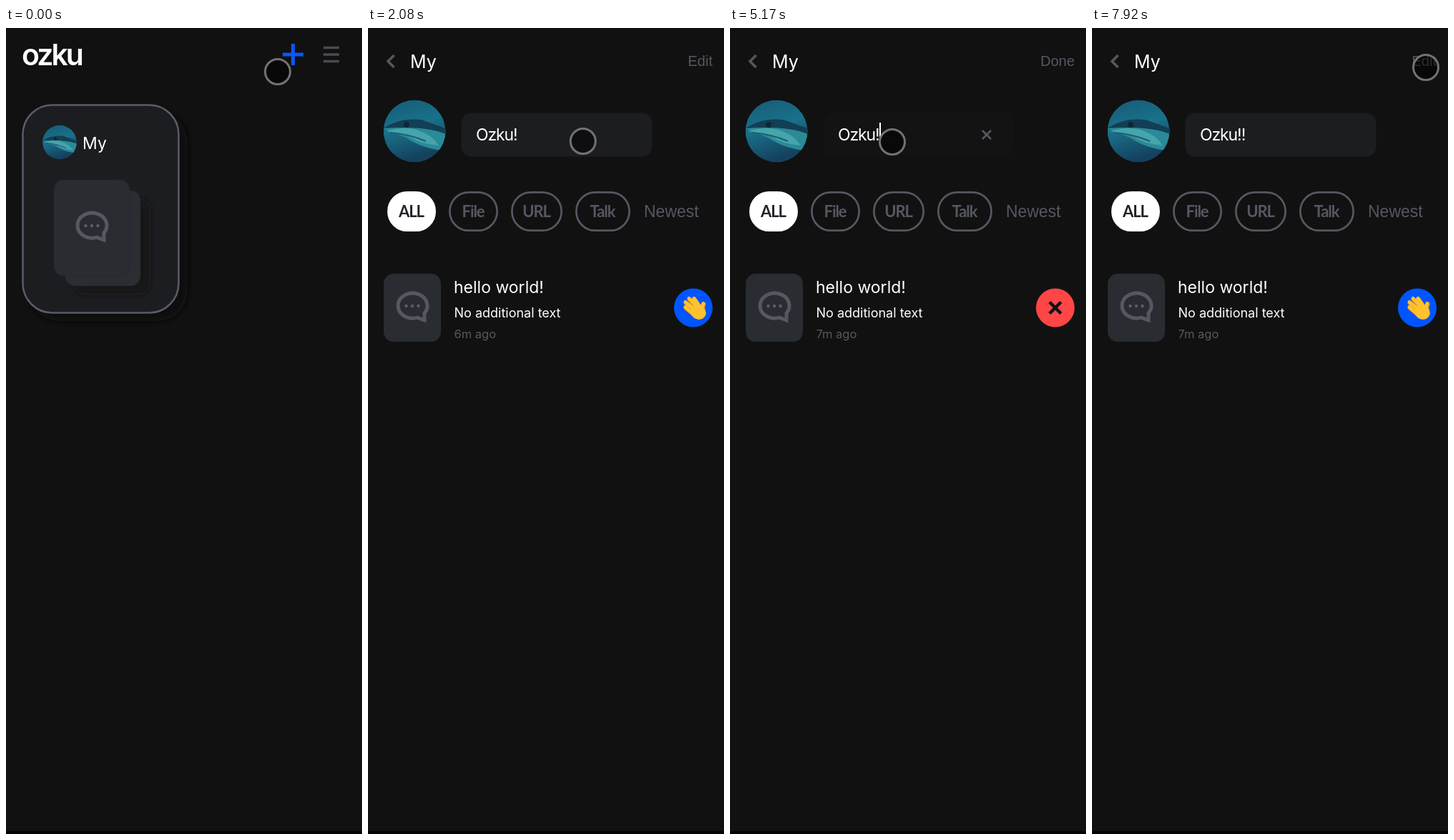
An HTML page that plays this animation: 498x1125 px, repeating every 8 s.

```html
<!DOCTYPE html>
<html lang="en">
<head>
<meta charset="utf-8">
<style>
  html, body { margin: 0; height: 100%; overflow: hidden; background: #111; }
  svg { display: block; width: 100%; height: 100%; }
  text { font: 400 23px Inter, sans-serif; fill: #fff; }
  .logo { font-size: 41px; font-weight: 600; letter-spacing: -3px; }
  .title { font-size: 25px; }
  .name { letter-spacing: -1.1px; }
  .note { font-size: 18px; }
  .age { font-size: 16.5px; }
  .chip { font: 700 22px Lato, sans-serif; letter-spacing: -1.1px; text-anchor: middle; }
  .plain { font: 20px "Liberation Sans", Arial, sans-serif; }
  .age, .chip, .plain { fill: #555862; }
  .line { fill: none; stroke: #555862; }
</style>
</head>
<body>
<svg viewBox="0 0 498 1125">
  <defs>
    <linearGradient id="sea" x2=".3" y2="1">
      <stop stop-color="#175a76"/><stop offset=".5" stop-color="#19718a"/><stop offset="1" stop-color="#14415f"/>
    </linearGradient>
    <clipPath id="round"><circle r="43.5"/></clipPath>
    <filter id="soft" x="-30%" y="-30%" width="160%" height="160%"><feGaussianBlur stdDeviation="5"/></filter>
    <g id="photo" clip-path="url(#round)">
      <circle r="43.5" fill="url(#sea)"/>
      <path d="M-44-4Q-20-20 10-16L44-4V28Q10 24-12 9Z" fill="#2b8a98"/>
      <path d="M-44-4Q-20-20 10-16L44-4V4Q15-8-44-4Z" fill="#123f55"/>
      <path d="M-40 0Q-10-8 8 0Q24 5 34 20Q8 18-8 7Z" fill="#55b3b5" opacity=".65"/>
      <path d="M-34 2Q-8 4 16 14" fill="none" stroke="#1c5f70" stroke-width="2"/>
      <circle cx="-11" cy="-9" r="4" fill="#0b2937"/>
    </g>
    <g id="bubble" fill="#5a5d69">
      <path class="line" d="M17 20V10A20.5 17.5 0 1 0 7 16.2Z" stroke-width="5"/>
      <circle cx="-8.5" r="2.2"/><circle r="2.2"/><circle cx="8.5" r="2.2"/>
    </g>
  </defs>

  <rect width="498" height="1125" fill="#111"/>
  <rect y="1121" width="498" height="4" fill="#070305"/>

  <g id="home">
    <text class="logo" x="22" y="52">ozku</text>
    <path d="M387 37H416M401.5 22V52" stroke="#0a55ff" stroke-width="5"/>
    <path d="M444 27.5H466M444 37H466M444 46.5H466" stroke="#4a4b50" stroke-width="3.5"/>
    <rect x="32" y="117" width="222" height="292" rx="42" fill="#0c0c0d" filter="url(#soft)"/>
    <rect x="23.5" y="107.5" width="218" height="290" rx="41" fill="#1c1d21" stroke="#595c68" stroke-width="2.5"/>
    <use href="#photo" transform="translate(75 159.5) scale(.55)"/>
    <text x="107" y="169">My</text>
    <rect x="96" y="240" width="104" height="130" rx="14" fill="#131416" filter="url(#soft)"/>
    <rect x="83" y="227" width="105" height="133" rx="14" fill="#2a2d31"/>
    <rect x="67" y="212" width="106" height="134" rx="14" fill="#292c30" stroke="#25282b" stroke-width=".6"/>
    <use href="#bubble" x="120" y="276"/>
  </g>

  <g id="detail">
    <path class="line" d="M36.5 38L28 46.5L36.5 55" stroke-width="3.5"/>
    <text class="title" x="59" y="56">My</text>
    <text id="mode" class="plain" x="482" y="53" text-anchor="end"></text>
    <use href="#photo" x="65" y="144"/>
    <rect id="field" x="130.5" y="118.5" width="267" height="61" rx="14"/>
    <text id="name" class="name" x="151" y="157"></text>
    <path id="caret" d="M210 132V165" stroke="#fff" stroke-width="2"/>
    <g id="chips"></g>
    <text class="plain" x="386" y="264" style="font-size:23px">Newest</text>
    <rect x="22" y="343" width="80" height="95" rx="14" fill="#292c30"/>
    <use href="#bubble" x="62" y="388"/>
    <text x="120" y="370">hello world!</text>
    <text class="note" x="120.500" y="404">No additional text</text>
    <text id="age" class="age" x="120.500" y="433"></text>
    <g id="wave" transform="translate(455 390.500)">
      <circle r="27" fill="#0055ff"/>
      <g stroke="#ffc22e" stroke-width="6" stroke-linecap="round" fill="none">
        <path d="M-11-1L2 10M-11-8L4 4M-6-13L7 0M1-13L10 0M14-6Q11 0 14 7" stroke="#e08a1c" transform="translate(.7 1.3)"/>
        <ellipse cx="7" cy="6" rx="8" ry="7" fill="#ffc22e" transform="rotate(40 7 6)"/>
        <path d="M-11-1L2 10M-11-8L4 4M-6-13L7 0M1-13L10 0M14-6Q11 0 14 7" stroke-width="5"/>
      </g>
    </g>
    <g id="remove">
      <circle cx="455" cy="390.500" r="27" fill="#ff4646"/>
      <path d="M447 382.500l16 16m0-16l-16 16" stroke="#111" stroke-width="4.500"/>
      <path class="line" d="M353 143l12 12m0-12l-12 12" stroke-width="2.700"/>
    </g>
  </g>

  <circle id="cursor" r="17.500" fill="#000" fill-opacity=".5" stroke="#727272" stroke-width="3"/>
</svg>
<script>
const $ = id => document.getElementById(id);
const show = (id, on) => $(id).setAttribute('display', on ? 'inline' : 'none');

const LOOP = 8000, STEP = 1000 / 12;
const OPEN = 1830, EDIT = 4330, FOCUS = 5000, HIDE = 5830, TYPE = 6160, SHOW = 7080, DONE = 7660;

// Pointer stops: time, x, y
const stops = [
  [0, 380, 61], [80, 386, 58], [400, 386, 58], [580, 402, 50], [1250, 202, 180], [1500, 193, 201],
  [1830, 193, 201], [2420, 466, 92], [2670, 478, 103], [2830, 472, 98], [3300, 464, 64],
  [3700, 456, 44], [4080, 446, 47], [4330, 446, 47], [4920, 236, 151], [5160, 227, 159],
  [7080, 227, 159], [7420, 438, 65], [7660, 460, 53], [7920, 467, 55], [8000, 467, 55]
];

$('chips').innerHTML = [['ALL', 27, 68], ['File', 113, 69], ['URL', 200, 72], ['Talk', 290, 77]]
  .map(([label, x, w], i) => `
    <rect x="${x + 1.4}" y="229.3" width="${w - 2.8}" height="53.4" rx="26.5" stroke-width="2.7"
      fill="${i ? 'none' : '#fff'}" stroke="${i ? '#555862' : '#fff'}"/>
    <text class="chip" x="${x + w / 2 - .5}" y="263.5" ${i ? '' : 'style="fill:#222428"'}>${label}</text>`)
  .join('');

function pointerAt(t) {
  const i = Math.max(1, stops.findIndex(s => s[0] > t));
  const [t0, x0, y0] = stops[i - 1], [t1, x1, y1] = stops[i];
  const p = (t - t0) / (t1 - t0), e = p * p * (3 - 2 * p);
  return [x0 + (x1 - x0) * e, y0 + (y1 - y0) * e];
}

function draw(now) {
  const t = Math.floor((now % LOOP + 4) / STEP) * STEP % LOOP;
  const editing = t >= EDIT && t < DONE;
  show('home', t < OPEN);
  show('detail', t >= OPEN);
  show('wave', !editing);
  show('remove', editing);
  show('caret', t >= FOCUS && t < DONE);
  show('cursor', t < HIDE || t >= SHOW);
  $('mode').textContent = editing ? 'Done' : 'Edit';
  $('age').textContent = t < EDIT ? '6m ago' : '7m ago';
  $('name').textContent = t < TYPE ? 'Ozku!' : 'Ozku!!';
  $('field').setAttribute('fill', editing ? '#131314' : '#1c1d21');
  $('caret').setAttribute('transform', `translate(${t < TYPE ? 0 : 6})`);
  $('cursor').setAttribute('transform', `translate(${pointerAt(t)})`);
}

const start = performance.now();
function tick() {
  draw(performance.now() - start);
  requestAnimationFrame(tick);
}
tick();
</script>
</body>
</html>
```
